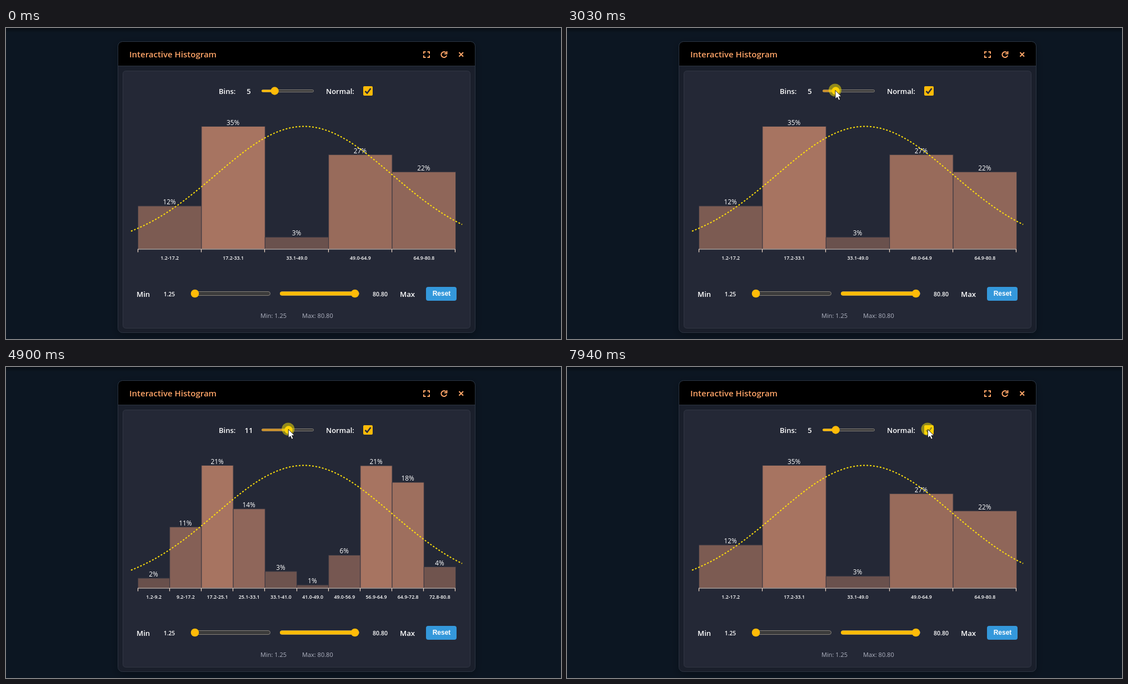
An HTML page with a canvas that plays this animation: 999 by 561 pixels, repeating every 8 s.

```html
<!DOCTYPE html>
<html lang="en">
<head>
<meta charset="utf-8">
<title>Interactive Histogram</title>
<style>
html, body { margin: 0; height: 100%; overflow: hidden; background: #0c1622; }
canvas { display: block; }
</style>
</head>
<body>
<canvas id="stage" width="999" height="561"></canvas>
<script>
const ctx = document.getElementById('stage').getContext('2d');
const LOOP = 8000, ENTER = 990, PRESS = 3030, RELEASE = 7030, PRESS_CHECK = 7930, REDRAW_LAG = 100;
const LEFT = 237, RIGHT = 809, BASE = 398.5, HEIGHT = 221;
const MIN = 1.249, MAX = 80.8;
const AMBER = '#ffbb08', PEACH = '#ffa568', SANS = '"Open Sans", "Noto Sans", sans-serif';

// Progress from 0 to 1 between two times; a power above 1 starts slowly
const ramp = (t, from, to, power = 1) =>
  Math.min(1, Math.max(0, (t - from) / (to - from))) ** power;

function pointerAt(t) {
  const enter = ramp(t, ENTER, 2220, 2.4), settle = ramp(t, 2220, 2620);
  const drag = ramp(t, 3780, 5060, 1.4), back = ramp(t, 5880, 6480), cross = ramp(t, RELEASE, 7940);
  return {
    x: 990 - 513 * enter + 5.5 * settle + 30.5 * drag - 31 * back + 167 * cross,
    y: 552 - 446 * enter + 6 * settle,
  };
}

function binsAt(t) {
  if (t < PRESS) return 5;
  return Math.round((pointerAt(Math.min(t, RELEASE)).x - 467) / 4.16) + 1;
}

// The data is a mix of two normal distributions over the range 0 to 1
const normalCdf = z => 1 / (1 + Math.exp(-1.5976 * z - .07056 * z ** 3));
const dataCdf = u => .505 * normalCdf(11.22 * (u - .2615)) + .495 * normalCdf(12.96 * (u - .79));

function text(str, x, y, size, { weight = 400, color = '#fff', align = 'center', family = SANS } = {}) {
  ctx.font = `${weight} ${size}px ${family}`;
  ctx.fillStyle = color;
  ctx.textAlign = align;
  ctx.fillText(str, x, y);
}

function box(x, y, w, h, r, fill, stroke) {
  ctx.beginPath();
  ctx.roundRect(x, y, w, h, r);
  if (fill) { ctx.fillStyle = fill; ctx.fill(); }
  if (stroke) { ctx.strokeStyle = stroke; ctx.lineWidth = 1; ctx.stroke(); }
}

function disc(x, y, r, fill) {
  ctx.beginPath();
  ctx.arc(x, y, r, 0, 7);
  ctx.fillStyle = fill;
  ctx.fill();
}

function line(d, color, width) {
  ctx.strokeStyle = color;
  ctx.lineWidth = width;
  ctx.stroke(new Path2D(d));
}

function slider(x, y, w, h, thumb, radius, fill = AMBER) {
  box(x + .5, y - h / 2, w - 1, h, h / 2, '#3b3b3b', '#858079');
  box(x, y - h / 2, thumb - x, h, h / 2, fill);
  disc(thumb, y, radius, AMBER);
}

function drawWindow() {
  ctx.fillStyle = '#0c1622';
  ctx.fillRect(0, 0, 999, 561);
  const shade = ctx.createLinearGradient(0, 0, 0, 9);
  shade.addColorStop(0, 'rgba(0,0,0,.4)');
  shade.addColorStop(1, 'rgba(0,0,0,0)');
  ctx.fillStyle = shade;
  ctx.fillRect(0, 0, 999, 9);

  ctx.save();
  ctx.shadowColor = 'rgba(0,0,0,.3)';
  ctx.shadowBlur = 16;
  ctx.shadowOffsetY = 4;
  box(202, 25, 642, 525, 8, '#1a1f2b');
  ctx.restore();
  box(202, 25, 642, 43, [8, 8, 0, 0], '#000');
  line('M202 68.5H844', '#2c3440', 1);
  box(201.5, 24.5, 643, 525, 8, null, '#2c3542');
  box(210.5, 77.5, 625, 464, 5, '#242836', '#313643');

  text('Interactive Histogram', 222, 53, 15, { weight: 600, color: PEACH, align: 'left' });
  line('M752 46.5V43H755.5M758.5 43H762V46.5M762 49.5V53H758.5M755.5 53H752V49.5', PEACH, 2);
  line('M792 44.5A5 5 0 1 0 793.2 49.5M793.5 42V46.5H789', PEACH, 2);
  line('M815.5 44L823 51.5M823 44L815.5 51.5', PEACH, 2);
}

function drawControls(t) {
  const bold = { weight: 600, align: 'left' }, gray = { color: '#b0b4c2', align: 'left' };
  const bins = binsAt(t), held = t >= PRESS && t < RELEASE;
  text('Bins:', 383, 119, 13, bold);
  text(bins, 437, 119, 13, { weight: 600 });
  slider(460, 113.5, 94, 4, 467 + (bins - 1) * 4.16, 7.2, held ? '#cc9028' : AMBER);
  text('Normal:', 576, 119, 13, bold);
  box(643, 105, 17, 17, 2, AMBER);
  line('M646.5 114L650 117.5L656.5 109', '#2b2d39', 2.6);

  text('Min', 235, 485, 13.2, bold);
  text('1.25', 294, 484, 10.3, { weight: 600 });
  slider(333, 479, 143, 7, 340, 7.3);
  slider(493, 479, 143, 7, 628, 7.3);
  text('80.80', 673.5, 484, 10.5, { weight: 600 });
  text('Max', 709, 485, 13.2, bold);
  box(756, 467, 55, 25, 4, '#3498db');
  text('Reset', 784, 483, 12, { weight: 700, family: '"Liberation Sans", Arial, sans-serif' });
  text('Min: 1.25', 458, 523, 11, gray);
  text('Max: 80.80', 533, 523, 11, gray);
}

function drawChart(bins) {
  const width = (RIGHT - LEFT) / bins;
  const edge = i => (MIN + (MAX - MIN) * i / bins).toFixed(1);
  const shares = Array.from({ length: bins }, (_, i) => dataCdf((i + 1) / bins) - dataCdf(i / bins));
  const peak = Math.max(...shares);

  shares.forEach((share, i) => {
    const k = share / peak, h = HEIGHT * k;
    box(LEFT + i * width + .5, BASE - h, width, h, 0, `rgba(255,167,126,${.29 + .31 * k})`, '#373640');
  });

  let ticks = `M${LEFT} 399H${RIGHT}`;
  for (let i = 0; i <= bins; i++) ticks += `M${Math.floor(LEFT + i * width) + (i < bins ? .5 : -.5)} 399V404.5`;
  line(ticks, '#f3dccb', 1.2);

  shares.forEach((share, i) => {
    const x = LEFT + (i + .5) * width;
    text(Math.round(share * 100) + '%', x, BASE - HEIGHT * share / peak - 3, 11.8);
    text(`${edge(i)}-${edge(i + 1)}`, x + .5, 418, 8.8, { weight: 600 });
  });

  ctx.beginPath();
  for (let x = 225; x <= 821; x += 2) {
    ctx.lineTo(x, BASE - HEIGHT * Math.exp(-(((x - 536.4) / 158.4) ** 2) / 2));
  }
  ctx.setLineDash([3, 3]);
  ctx.strokeStyle = '#ffe00a';
  ctx.lineWidth = 2;
  ctx.stroke();
  ctx.setLineDash([]);
}

function drawPointer(t) {
  if (t < ENTER) return;
  const { x, y } = pointerAt(t);
  if (t >= PRESS && t < RELEASE || t >= PRESS_CHECK) disc(x, y, 11.5, 'rgba(255,235,0,.5)');
  ctx.save();
  ctx.translate(x + .5, y + .5);
  const arrow = new Path2D('M0 0V15.5L3.6 12.2L6 17.8L8.7 16.6L6.3 11.2H11Z');
  ctx.fillStyle = '#fff';
  ctx.fill(arrow);
  ctx.strokeStyle = '#111';
  ctx.lineWidth = .9;
  ctx.stroke(arrow);
  ctx.restore();
}

function draw() {
  const t = performance.now() % LOOP;
  drawWindow();
  drawChart(binsAt(t - REDRAW_LAG));
  drawControls(t);
  drawPointer(t);
  requestAnimationFrame(draw);
}
draw();
</script>
</body>
</html>
```
